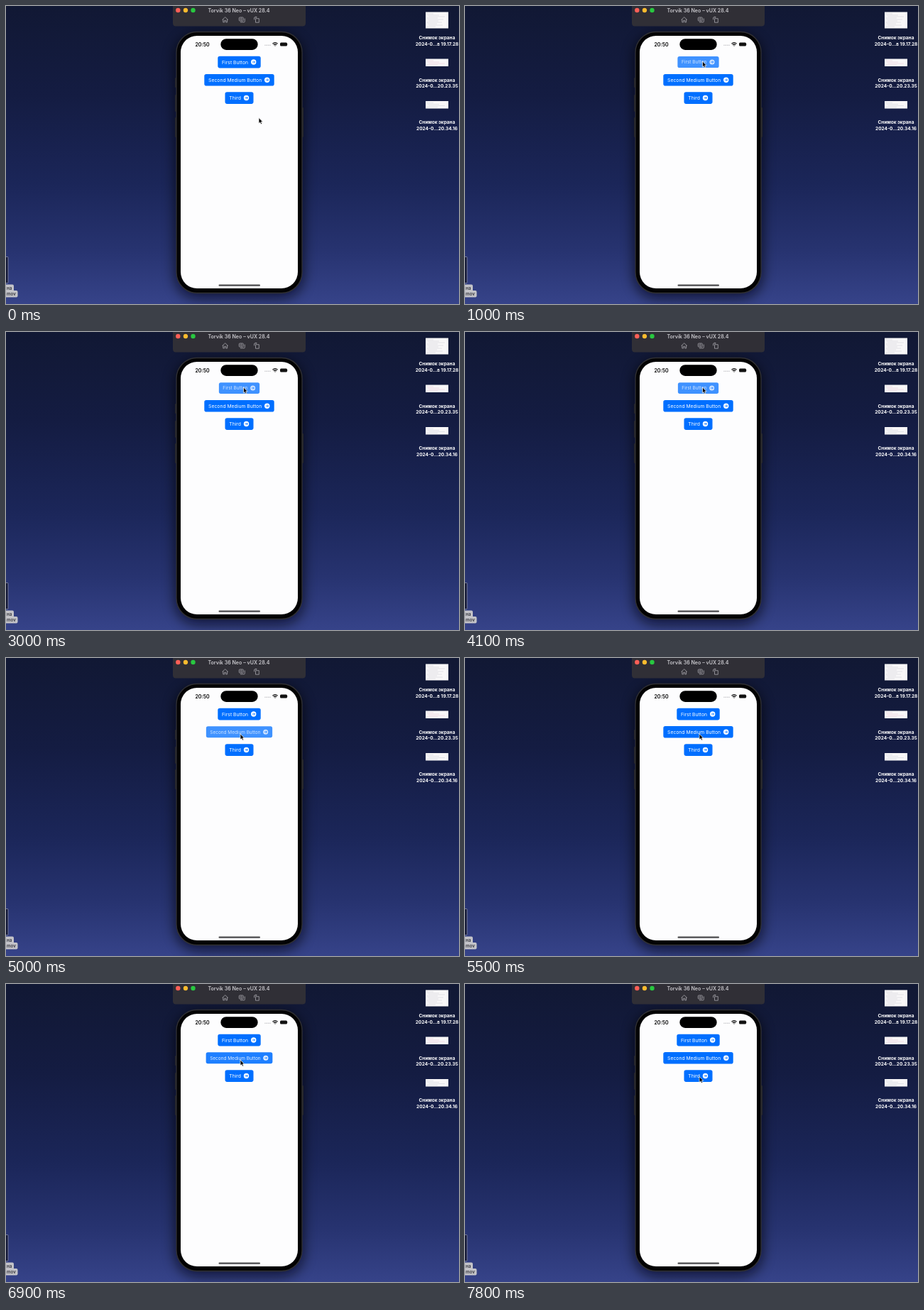
Write an HTML page that moves like this. It is 638 px wide and 420 px high and loops after 8 s.

```html
<!DOCTYPE html>
<html lang="en">
<head>
<meta charset="utf-8">
<title>Button press demo</title>
<style>
  html, body { margin: 0; width: 100%; height: 100%; overflow: hidden; background: #161e52; }
  svg { display: block; width: 638px; height: 420px; font-family: Inter, "Noto Sans", sans-serif; }
  .file { font-size: 6.5px; font-weight: 700; fill: #fff; text-anchor: middle; }
  .btn text { font-size: 6.8px; fill: #fff; }
  .icon { fill: none; stroke: #a9a8ae; stroke-width: .8; }
</style>
</head>
<body>
<svg viewBox="0 0 638 420">
  <defs>
    <linearGradient id="sky" x2="0" y2="1">
      <stop offset="0" stop-color="#111834"/>
      <stop offset=".3" stop-color="#141c42"/>
      <stop offset=".6" stop-color="#1b2659"/>
      <stop offset=".82" stop-color="#273370"/>
      <stop offset="1" stop-color="#364389"/>
    </linearGradient>
    <filter id="blur" x="-30%" y="-20%" width="160%" height="140%"><feGaussianBlur stdDeviation="9"/></filter>
  </defs>
  <rect width="638" height="420" fill="url(#sky)"/>

  <!-- desktop files -->
  <g id="files"></g>
  <rect x="-20" y="353.5" width="23" height="37" rx="1" fill="#151a38" stroke="#8b90ac" stroke-width=".8"/>
  <g fill="#c3c3c8">
    <rect x="-6" y="392.5" width="17" height="10" rx="2"/>
    <rect x="-6" y="401" width="22.5" height="9.5" rx="2"/>
  </g>
  <g font-size="6.2" font-weight="600" fill="#34353d">
    <text x="1" y="399.5">на</text>
    <text x="1" y="408">mov</text>
  </g>

  <!-- phone -->
  <rect x="238" y="40" width="181" height="372" rx="32" fill="#04060f" opacity=".65" filter="url(#blur)"/>
  <g fill="#25252a">
    <rect x="238" y="101" width="3" height="14" rx="1"/>
    <rect x="238" y="125" width="3" height="24" rx="1"/>
    <rect x="238" y="157" width="3" height="28" rx="1"/>
    <rect x="416.5" y="143" width="2.5" height="42" rx="1"/>
  </g>
  <rect x="240" y="36.5" width="177" height="368" rx="29" fill="#020203" stroke="#303033" stroke-width="1.4"/>
  <rect x="246" y="42" width="165" height="356" rx="23" fill="#fdfdfe"/>
  <rect x="302.3" y="46.3" width="52.4" height="15.6" rx="7.8"/>
  <text x="266.5" y="57" font-size="7" font-weight="600">20:50</text>
  <g fill="#b8b8bc">
    <circle cx="365" cy="55.3" r=".7"/><circle cx="367.3" cy="55.3" r=".7"/>
    <circle cx="369.6" cy="55.3" r=".7"/><circle cx="371.9" cy="55.3" r=".7"/>
  </g>
  <g fill="none" stroke="#000" stroke-width="1.2">
    <path d="M375.5 53.2Q379 50.2 382.5 53.2M376.9 54.9Q379 53 381.1 54.9"/>
    <path d="M378.4 56H379.6"/>
  </g>
  <rect x="386" y="51.6" width="10" height="4.8" rx="1.5" fill="#111"/>
  <rect x="396.5" y="53.2" width=".7" height="1.6" fill="#999"/>
  <rect x="299.5" y="392.6" width="58.5" height="2.2" rx="1.1" fill="#4a4a4c"/>

  <!-- window bar -->
  <path d="M235 0H422V24Q422 28.5 417.500 28.5H239.5Q235 28.5 235 24Z" fill="#302f36"/>
  <circle cx="242.3" cy="6" r="3.2" fill="#fe5f57"/>
  <circle cx="253" cy="6" r="3.2" fill="#febb2e"/>
  <circle cx="263.5" cy="6" r="3.2" fill="#28c840"/>
  <text x="328" y="8.8" font-size="7.1" font-weight="600" fill="#c8c7cc" text-anchor="middle">Torvik 36 Neo – vUX 28.4</text>
  <g class="icon">
    <path d="M304.6 19.5L308.7 15.7L312.8 19.5M305.8 18.7V22.9H307.7V20.3H309.7V22.9H311.6V18.7"/>
    <rect x="328.3" y="16" width="6" height="5" rx="1"/>
    <path d="M330 22.8H335.3Q336.3 22.8 336.3 21.8V17.5"/>
    <circle cx="331.3" cy="18.5" r="1.3"/>
    <path d="M351.5 17.7H356.3V23.2H351.5ZM349.6 19.3V17Q349.6 15.7 351 15.7H353M352 14.7L353 15.7L352 16.7"/>
  </g>

  <g id="buttons"></g>
  <path id="cursor" d="M0 0V8L1.8 6.4L3 9.1L4.5 8.4L3.3 5.8H5.7Z" stroke="#fff" stroke-width=".7" stroke-linejoin="round"/>
</svg>
<script>
const $ = id => document.getElementById(id);
const LOOP = 8000, EASE = 230, SHRINK = 0.1;

// label, left, width, centre y, [press, release] times
const buttons = [
  ["First Button", 298.3, 60.4, 79, [[955, 1280], [1880, 2580], [2930, 3310], [4030, 4380]]],
  ["Second Medium Button", 279.3, 98.4, 104.2, [[4930, 5290], [5760, 6290], [6660, 6830]]],
  ["Third", 308.5, 40, 129.5, []]
].map(([label, x, w, y, taps]) => ({ label, x, w, y, taps, cx: x + w / 2 }));

$("buttons").innerHTML = buttons.map(({ label, x, w, y }) => `<g class="btn">
  <rect x="${x}" y="${y - 8.3}" width="${w}" height="16.7" rx="2.8" fill="#006fff"/>
  <g><text x="${x + 5.8}" y="${y + 2.5}">${label}</text>
  <g transform="translate(${x + w - 10} ${y})"><circle r="3.7" fill="#fff"/>
  <path d="M-2 0H1.8M.2 -1.7L1.9 0L.2 1.7" fill="none" stroke="#006fff" stroke-width=".8"/></g></g></g>`).join("");
const nodes = [...$("buttons").children];

// name, thumbnail top, thumbnail height, text baseline, tint
$("files").innerHTML = [
  ["2024-0…в 19.17.28", 8.5, 23, 47.4, "#9d9aa8"],
  ["2024-0…20.23.35", 74.5, 10.5, 106.8, "#d38fae"],
  ["2024-0…20.34.16", 134, 10.5, 166.4, "#98a3bd"]
].map(([name, top, h, base, tint]) => {
  let rows = "";
  for (let y = 2.5, i = 0; y < h - 1; y += 2, i++)
    rows += `M${593 + i % 3} ${top + y}h${9 + i * 7 % 15}`;
  return `<rect x="591" y="${top}" width="32" height="${h}" fill="#f8f7f8"/>
    <path d="${rows}" stroke="${tint}" stroke-width=".6" opacity=".4"/>
    <text class="file" x="607" y="${base}">Снимок экрана</text>
    <text class="file" x="607" y="${base + 8.6}">${name}</text>`;
}).join("");

const clamp = v => Math.min(1, Math.max(0, v));
const easeOut = p => 1 - (1 - p) ** 2;
const smooth = p => p * p * (3 - 2 * p);

// start, end, target of each cursor move
const moves = [[50, 900, 334.5, 78], [4480, 4900, 330, 107], [7350, 7800, 330, 130.5]];

function cursorAt(t) {
  let x = 356, y = 157.5;
  for (const [a, b, tx, ty] of moves) {
    const p = smooth(clamp((t - a) / (b - a)));
    x += (tx - x) * p;
    y += (ty - y) * p;
  }
  return `translate(${x} ${y})`;
}

function pressAt(taps, t) {
  let depth = 0, dim = 0;
  for (const [down, up] of taps) {
    if (t < down) break;
    const back = easeOut(clamp((t - up) / EASE));
    depth = easeOut(clamp((t - down) / EASE)) * (1 - back);
    dim = 1 - back;
  }
  return { depth, dim };
}

function draw(now) {
  const t = now % LOOP;
  buttons.forEach(({ cx, y, taps }, i) => {
    const { depth, dim } = pressAt(taps, t);
    const node = nodes[i], [box, face] = node.children;
    node.setAttribute("transform",
      `translate(${cx} ${y}) scale(${1 - SHRINK * depth}) translate(${-cx} ${-y})`);
    box.setAttribute("opacity", 1 - 0.25 * dim);
    face.setAttribute("opacity", 1 - 0.25 * dim);
  });
  $("cursor").setAttribute("transform", cursorAt(t));
}

const start = performance.now();
function tick() {
  draw(performance.now() - start);
  requestAnimationFrame(tick);
}
tick();
</script>
</body>
</html>
```
